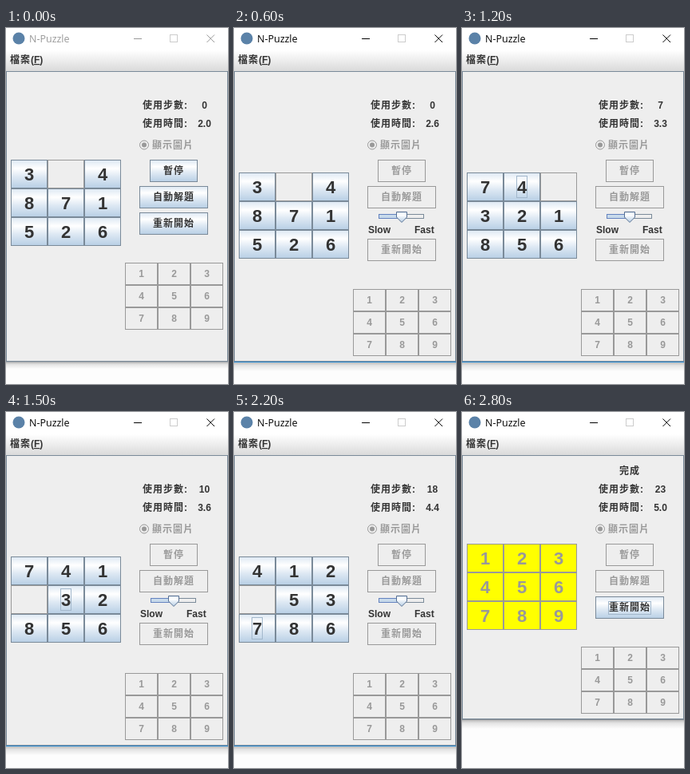
Write an HTML page that moves like this. It is 278 by 446 pixels and loops after 4 s.

```html
<!DOCTYPE html>
<html lang="zh-Hant">
<head>
<meta charset="utf-8">
<title>N-Puzzle</title>
<style>
html, body { margin: 0; width: 100%; height: 100%; overflow: hidden; background: #fdfdfd; }
svg { display: block; width: 278px; height: 446px; }
rect { shape-rendering: crispEdges; }
text { font: bold 12px 'Liberation Sans', 'Noto Sans CJK TC', 'Noto Sans CJK', sans-serif; fill: #333; white-space: pre; }
.mid { text-anchor: middle; }
.cjk { letter-spacing: 1px; }
.big { font-size: 22px; }
.title { font: 12.5px 'Open Sans', 'Noto Sans', sans-serif; }
</style>
</head>
<body>
<svg viewBox="0 0 278 446" xmlns="http://www.w3.org/2000/svg">
  <defs>
    <linearGradient id="face" x2="0" y2="1">
      <stop offset="0" stop-color="#dde8f3"/>
      <stop offset=".3" stop-color="#fff"/>
      <stop offset=".6" stop-color="#dde8f3"/>
      <stop offset="1" stop-color="#b8cfe5"/>
    </linearGradient>
    <linearGradient id="menu" x2="0" y2="1">
      <stop offset="0" stop-color="#fff"/>
      <stop offset="1" stop-color="#dadada"/>
    </linearGradient>
    <linearGradient id="shade" x2="0" y2="1">
      <stop offset="0" stop-color="#000" stop-opacity=".3"/>
      <stop offset=".4" stop-color="#000" stop-opacity=".1"/>
      <stop offset="1" stop-color="#000" stop-opacity="0"/>
    </linearGradient>
  </defs>
  <g id="stage"></g>
</svg>
<script>
const LOOP = 4000, TICK = 100, LAST = 28;
const DARK = '#7a8a99', GREY = '#999', INK = '#333', PANEL = '#eee', FOCUS = '#a3b8cc';
const MOVES = 'DDLUURRDLLURRDLDLUURRDD';
const STEP = { U: -3, D: 3, L: -1, R: 1 };
const stage = document.getElementById('stage');

const fill = (x, y, w, h, c) => `<rect x="${x}" y="${y}" width="${w}" height="${h}" fill="${c}"/>`;
const box = (x, y, w, h, line, c = 'none') =>
  `<rect x="${x + .5}" y="${y + .5}" width="${w - 1}" height="${h - 1}" fill="${c}" stroke="${line}"/>`;
const text = (x, y, s, cls = '', c = INK) => `<text x="${x}" y="${y}" class="${cls}" style="fill:${c}">${s}</text>`;

// Board after n moves of the blank (9), plus the place of the last moved tile.
function boardAt(n) {
  const cells = [3, 9, 4, 8, 7, 1, 5, 2, 6];
  let blank = 1, moved = -1;
  for (const m of MOVES.slice(0, n)) {
    const next = blank + STEP[m];
    cells[blank] = cells[next];
    cells[next] = 9;
    moved = blank;
    blank = next;
  }
  return { cells, moved };
}

function button(x, y, w, label, { on = true, hover = false, focus = false } = {}) {
  const textW = label.length * 13, tx = x + (w - textW) / 2;
  let s = box(x, y, w, 28, on ? DARK : GREY, on ? 'url(#face)' : PANEL);
  if (hover) {
    s += box(x, y, w, 28, '#b8cfe5') + box(x + 1, y + 1, w - 2, 26, DARK) + box(x + 2, y + 2, w - 4, 24, '#b8cfe5');
  }
  if (focus) s += box(tx - 1, y + 6, textW + 2, 17, FOCUS);
  return s + text(tx, y + 18, label, 'cjk', on ? INK : GREY);
}

function titleBar(active) {
  const c = active ? '#000' : GREY;
  return fill(0, 0, 278, 28, '#fff') +
    '<circle cx="16" cy="13" r="7.5" fill="#5b82a8"/>' +
    text(29, 18, 'N-Puzzle', 'title', c) +
    fill(160, 13, 10, 1, c) + box(205, 8, 10, 10, '#ccc') +
    `<path d="M251.5 8.5l9.5 9.5m0-9.5l-9.5 9.5" stroke="${c}" fill="none"/>` +
    fill(0, 28, 278, 26, 'url(#menu)') +
    text(5, 44, '檔案', 'cjk') +
    text(31, 44, '(<tspan text-decoration="underline">F</tspan>)');
}

function frame(bottom, active, done) {
  const edge = done ? '#8a8f94' : active ? '#2e8fd6' : '#a5a9ad';
  return fill(0, bottom, 278, active ? 12 : 9, 'url(#shade)') +
    box(0, 54, 278, bottom - 54, DARK, PANEL) +
    fill(0, bottom, 278, 1, edge);
}

function board(top, n, done) {
  const { cells, moved } = boardAt(n);
  return cells.map((v, i) => {
    const x = 6 + i % 3 * 46, y = top + Math.floor(i / 3) * 36;
    const empty = v === 9 && !done;
    const face = done ? '#ff0' : empty ? PANEL : 'url(#face)';
    return box(x, y, 46, 36, done || empty ? GREY : DARK, face) +
      (i === moved && !done ? box(x + 16, y + 4, 14, 28, FOCUS) : '') +
      (empty ? '' : text(x + 23, y + 26, v, 'mid big', done ? GREY : INK));
  }).join('');
}

function preview(top) {
  let s = '';
  for (let i = 0; i < 9; i++) {
    const x = 149 + i % 3 * 41, y = top + Math.floor(i / 3) * 28;
    s += box(x, y, 41, 28, GREY, PANEL) + text(x + 20.5, y + 18, i + 1, 'mid', GREY);
  }
  return s;
}

function slider() {
  return box(181, 233, 57, 6, DARK, PANEL) +
    box(181, 233, 29, 6, '#6382bf', '#c8daeb') +
    '<path d="M203.5 230.5h13v6.5l-6.5 6.5l-6.5-6.5z" fill="url(#face)" stroke="#566f92"/>' +
    text(168, 257, 'Slow') + text(226, 257, 'Fast');
}

function draw(tick) {
  const done = tick === LAST, solving = tick >= 6 && !done;
  const active = tick >= 5;
  const steps = Math.min(MOVES.length, Math.max(0, Math.floor((tick * 11 - 60) / 10)));
  const seconds = (2 + tick * .108).toFixed(1);

  stage.innerHTML = fill(0, 0, 278, 446, '#fdfdfd') +
    frame(done ? 385 : 418, active, done) +
    titleBar(active) +
    (done ? text(197, 78, '完成', 'cjk') : '') +
    text(171, 101, '使用步數:', 'cjk') + text(248.5, 101, steps, 'mid') +
    text(171, 124, '使用時間:', 'cjk') + text(248.5, 124, seconds, 'mid') +
    `<circle cx="173" cy="146.5" r="5.5" fill="${PANEL}" stroke="${GREY}"/>` +
    `<circle cx="173" cy="146.5" r="3" fill="${GREY}"/>` +
    text(183, 151, '顯示圖片', 'cjk', GREY) +
    button(180, 165, 60, '暫停', { on: tick < 6 }) +
    button(167, 198, 86, '自動解題', { on: tick < 6, hover: tick === 4 || tick === 5 }) +
    button(167, solving ? 264 : 231, 86, '重新開始', { on: !solving, focus: done }) +
    (solving ? slider() : '') +
    board(solving ? 181 : 165, steps, done) +
    preview(solving ? 327 : 294);
}

const start = performance.now();
let shown = -1;
function loop() {
  const t = (performance.now() - start) % LOOP;
  const tick = Math.min(LAST, Math.floor(t / TICK));
  if (tick !== shown) draw(shown = tick);
  requestAnimationFrame(loop);
}
loop();
</script>
</body>
</html>
```
